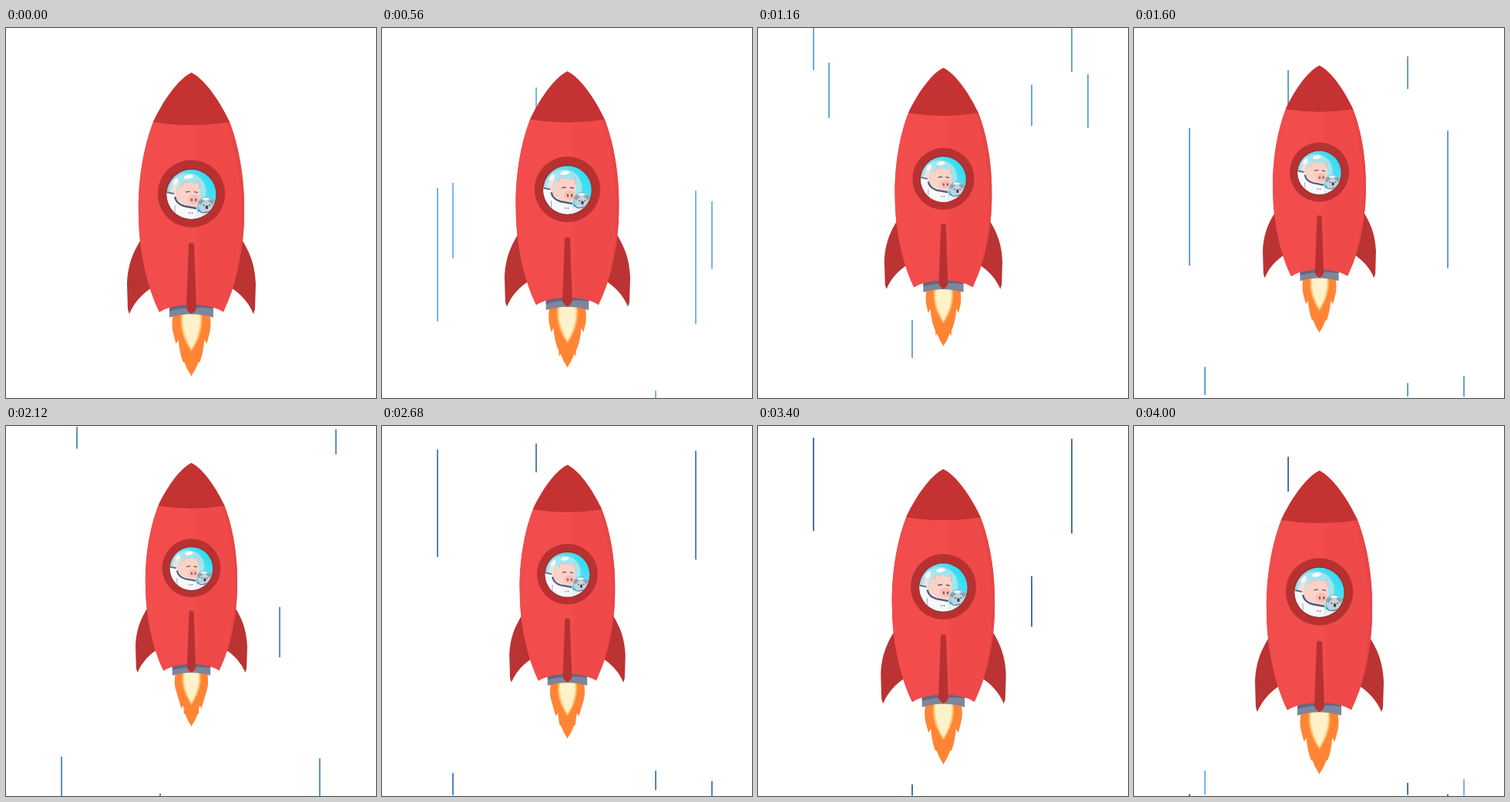
An HTML page with a canvas that plays this animation: 480x480 px, repeating every 4040 ms.

```html
<!DOCTYPE html>
<html lang="en">
<head>
<meta charset="utf-8">
<title>Rocket</title>
<style>
html, body { margin: 0; width: 100%; height: 100%; overflow: hidden; background: #fff; }
canvas { display: block; width: 100vw; height: 100vh; }
</style>
</head>
<body>
<canvas id="stage" width="480" height="480"></canvas>
<script>
const ctx = document.getElementById('stage').getContext('2d');
const LOOP = 4040, STEP = 40, CX = 240.5, TOP = -18;
const RED = '#ef4949', DARK = '#b83131', CAP = '#c53232';

// Each streak: x, tail lag and phase lead in radians, passes as [start ms, rad per ms].
const wide = [[59, .00439], [901, .00266], [2400, .00455], [3144, .00439]];
const mid = [[146, .00439], [925, .00439], [2010, .00455], [3405, .00508]];
const streaks = [
  { x: 72, lag: .765, lead: 0, passes: wide },
  { x: 407, lag: .765, lead: .015, passes: wide },
  { x: 92, lag: .41, lead: 0, passes: mid, fresh: true },
  { x: 428, lag: .37, lead: .06, passes: mid, fresh: true },
  { x: 200, lag: .285, lead: 0, passes: [[71, .00227], [1378, .00439], [2458, .00326], [3802, .00439]] },
  { x: 355, lag: .275, lead: 0, passes: [[20, .0058], [914, .00439], [1160, .0019], [2680, .0023]] }
];

const clamp = (v, a, b) => Math.min(b, Math.max(a, v));
const fallY = a => 240 * (1 - Math.cos(clamp(a, 0, Math.PI)));

function fill(color, d) {
  ctx.fillStyle = color;
  ctx.fill(new Path2D(d));
}

function line(color, width, d) {
  ctx.strokeStyle = color;
  ctx.lineWidth = width;
  ctx.stroke(new Path2D(d));
}

function oval(color, x, y, rx, ry = rx, turn = 0) {
  ctx.fillStyle = color;
  ctx.beginPath();
  ctx.ellipse(x, y, rx, ry, turn, 0, Math.PI * 2);
  ctx.fill();
}

function ring(color, width, x, y, r) {
  ctx.strokeStyle = color;
  ctx.lineWidth = width;
  ctx.beginPath();
  ctx.arc(x, y, r, 0, Math.PI * 2);
  ctx.stroke();
}

function bothSides(draw) {
  draw();
  ctx.save();
  ctx.translate(2 * CX, 0);
  ctx.scale(-1, 1);
  draw();
  ctx.restore();
}

function blue(t) {
  const k = clamp((t - 500) / 2900, 0, 1);
  const mix = (a, b) => Math.round(a + (b - a) * k);
  return `rgb(${mix(98, 42)},${mix(174, 91)},${mix(219, 139)})`;
}

function drawStreaks(t) {
  for (const s of streaks) {
    s.passes.forEach(([start, rate], i) => {
      const a = (t - start) * rate + s.lead;
      if (t < start || a - s.lag > Math.PI) return;
      const head = fallY(a), tail = fallY(a - s.lag);
      ctx.fillStyle = s.fresh && i === 3 ? '#6aa9d8' : blue(t);
      ctx.fillRect(s.x - .8, tail, 1.7, head - tail);
    });
  }
}

// The side tongues slide down and inward; the old pair fades as a new one starts.
function drawFlame(t) {
  const q = (.2 + t / 200) % 1;
  const x = 219 + 8 * q, y = 405 + 24 * q;
  const nick = 5 * clamp(1 - q / .25, 0, 1);
  const low = Math.max(432, y + 8);
  bothSides(() => fill('#ff8535',
    `M241 370 L217 370 Q214 386 217 396 L${x} ${y} L${x + 3} ${y - 6 + 3 * q}
     Q${x + 4.5} ${(y + low) / 2} 229 ${low - nick / 2} L229.5 ${low + nick}
     L231.5 ${low + 2} Q235 444 240.5 451.5 L241 451.5 Z`));
  fill('#ffab58', 'M227 370 Q223 395 240.5 420 Q258 395 254 370 Z');
  fill('#ffd58d', 'M228.5 370 Q225 394 240.5 418 Q256 394 252.5 370 Z');
  fill('#fff1c9', 'M230 370 Q227 393 240.5 415.5 Q254 393 251 370 Z');
}

function drawPassengers() {
  ctx.save();
  ctx.beginPath();
  ctx.arc(CX, 215.8, 32, 0, Math.PI * 2);
  ctx.clip();
  const sky = ctx.createLinearGradient(215, 235, 266, 195);
  sky.addColorStop(0, '#a8f0f8');
  sky.addColorStop(.55, '#62e5f5');
  sky.addColorStop(1, '#2bdcf2');
  ctx.fillStyle = sky;
  ctx.fillRect(205, 180, 72, 72);

  // pig with helmet and suit
  oval('rgba(178,232,242,.8)', 235, 213, 25);
  ring('#8fcbd8', 1, 235, 213, 25);
  fill('#fad2c7', 'M227 206 L230 198 L237 201 Z M246 202 L251 199 L251 209 Z');
  fill('#fad2c7', 'M220 222 Q219 204 235 200 Q250 200 252 212 L252 226 Q247 236 230 231 Z');
  line('#dda49a', .7, 'M228 206 L231 199 L237 201 M246 202 L251 199 L251 208');
  fill('#fbded6', 'M214 216 Q213 203 223 198 L225 201 Q219 207 220 218 Z');
  line('#4b3b48', 1.2, 'M233 213 L239 212 M244 212.5 L249 213.5');
  oval('#f6bdb2', 243.5, 222.5, 7.5, 6);
  oval('#54384a', 241, 223, .9, 2);
  oval('#54384a', 246.3, 223, .9, 2);
  oval('#fff', 237, 193, 6, 2.5, -.15);
  oval('#f4fbfd', 220, 199, 2.5, 5, .65);
  fill('#f7f9fc', 'M207 212 L218 214 Q220 229 247 233 L249 250 L207 250 Z');
  line('#515875', 2.4, 'M219 219 Q221 228 231 231 L247 234');
  line('#9ba4b7', 1, 'M219 230 L219 244');
  line('#5f6a84', 2, 'M208 213 L218 215');
  oval('#e16b67', 238, 240, 1);
  oval('#647fa7', 241.5, 240, 1);

  // small companion
  oval('#a9dcea', 260, 230, 11);
  ring('#6fa5b9', .8, 260, 230, 11);
  oval('#8fa1ae', 253.5, 226, 3.5);
  oval('#8fa1ae', 266, 226, 3.5);
  oval('#c6d2d9', 260, 231, 7, 6.3);
  oval('#374657', 260.5, 232.5, 1.8, 2.6);
  oval('#374657', 256.5, 230, .9);
  oval('#374657', 264, 230, .9);
  oval('#fff', 259, 221.5, 4, 1.3);
  fill('#e9eff4', 'M247 240 Q252 236 260 239 Q267 237 270 243 L260 252 L245 250 Z');
  line('#66758b', 1.3, 'M249 235 Q252 241 260 239 L267 237');
  ctx.restore();
}

function drawRocket(t) {
  const s = 1 - .0665 * (1 - Math.cos(Math.PI * t / 2000));
  ctx.save();
  ctx.translate(CX, TOP);
  ctx.scale(s, s);
  ctx.translate(-CX, -TOP);

  drawFlame(t);
  bothSides(() => fill('#bb3333',
    'M174 276 C167 288 158 304 157 332 L158 365 L160 371 Q169 349 192 335 L192 280 Z'));

  fill('#7f859a', 'M212 360 L269 360 L269 375.5 Q240 367 212 375.5 Z');
  fill('#62677d', 'M212 358 L269 358 L269 364 Q240 360 212 367 Z');

  const hull = new Path2D(`M240.5 58 C222 67 202 98 191 122 C178 155 171 200 172 240
    C172 290 184 338 199 368.5 Q212 359.5 240.5 358.5 Q269 359.5 282 368.5
    C297 338 309 290 309 240 C310 200 303 155 290 122 C279 98 259 67 240.5 58 Z`);
  ctx.fillStyle = RED;
  ctx.fill(hull);
  ctx.save();
  ctx.clip(hull);
  fill('#f24c4c', 'M165 110 L247 110 L250 375 L165 375 Z');
  fill('#e84646', 'M284 118 Q309 190 305 260 Q302 320 283 370 L320 370 L320 118 Z');
  fill(CAP, 'M180 50 L300 50 L300 119 L290 122 Q240.5 130 191 122 L180 119 Z');
  ctx.restore();

  fill(DARK, 'M237 280 Q240.5 277.5 244 280 L247 362 Q247 367 240.5 371 Q234 367 234 362 Z');

  oval(DARK, CX, 215, 43.7);
  oval('#a92b2f', CX, 215.5, 33.5);
  drawPassengers();
  ctx.restore();
}

function frame(now) {
  const t = Math.floor((now % LOOP) / STEP) * STEP;
  ctx.fillStyle = '#fff';
  ctx.fillRect(0, 0, 480, 480);
  drawStreaks(t);
  drawRocket(t);
}

const begin = performance.now();
function tick() {
  frame(performance.now() - begin);
  requestAnimationFrame(tick);
}
tick();
</script>
</body>
</html>
```
